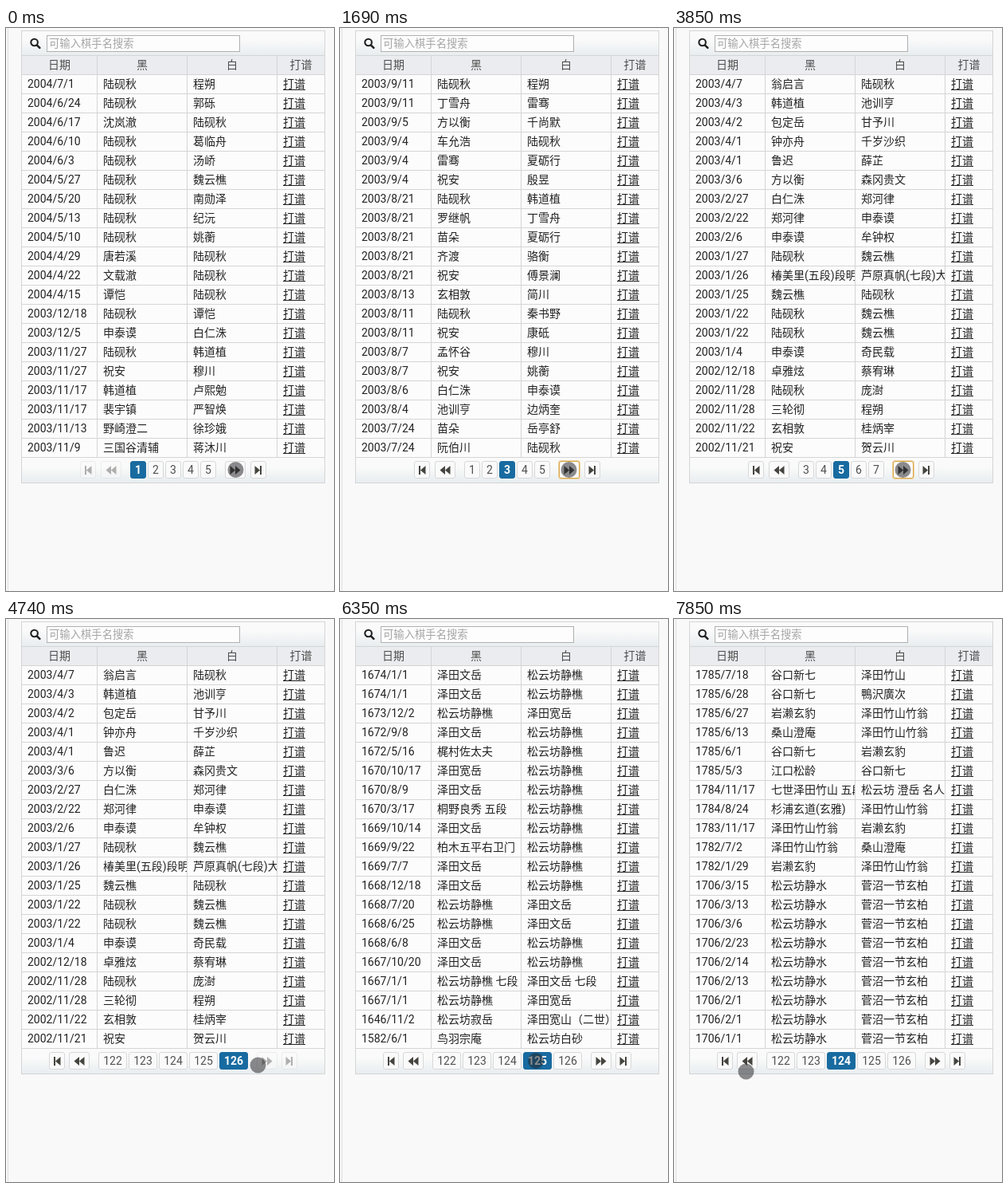
These frames come from a looping animation (412 px wide and 706 px high, 7.99 s). An HTML page:

```html
<!DOCTYPE html>
<html lang="zh-CN">
<head>
<meta charset="utf-8">
<style>
* { box-sizing: border-box; }
html, body { margin: 0; width: 100%; height: 100%; overflow: hidden; }
body { position: relative; background: #f9f9f9; color: #222;
  font: 14px/23px Roboto, "Noto Sans CJK SC", "Noto Sans CJK", sans-serif; }
#edge { position: absolute; left: 2px; top: 0; bottom: 0; width: 1px; background: #dedede; }
#grid { position: absolute; left: 19px; top: 3px; width: 382px; height: 568px;
  border: 1px solid #d5d5d5; background: #fcfcfc; }
.bar { position: relative; height: 30px; background: linear-gradient(#fafafa 35%, #e8edf0); }
.bar svg { position: absolute; left: 10px; top: 8px; }
.field { position: absolute; left: 31px; top: 5px; width: 243px; height: 21px; padding-left: 2px;
  border: 1px solid #b0b0b0; background: #fdfdfd; color: #a5a5a5; font-size: 13.33px; line-height: 19px; }
.row { display: grid; grid-template-columns: 95px 113px 113px 59px; height: 24px; border-top: 1px solid #d5d5d5; }
.row > * { padding-left: 7px; overflow: hidden; white-space: pre; border-right: 1px solid #d5d5d5; }
.row > :last-child { border-right: 0; }
.row u { text-underline-offset: 2px; }
.head { background: #ebecf0; color: #4f4f4f; text-align: center; }
.head > * { padding: 0; }
#pager { display: flex; justify-content: center; height: 32px; padding-top: 4px; border-top: 1px solid #d5d5d5; }
#pager i { flex: none; height: 22px; border: 1px solid #d7d8d9; border-radius: 3px; background: #fafafa;
  color: #4f4f4f; font-style: normal; line-height: 20px; text-align: center; }
#pager .num + .num { margin-left: 2px; }
#pager .on { background: #186ba0; border-color: #186ba0; color: #fff; font-weight: bold; }
#pager .off { opacity: .4; }
#pager .ring { border-color: #dba648; box-shadow: 0 0 0 1px #ecd2a0; }
#pager .flip { transform: scaleX(-1); }
#pager svg { position: static; display: block; margin: -1px; fill: #45443f; }
#pointer { position: absolute; left: -10px; top: -10px; width: 20px; height: 20px; border-radius: 50%; }
</style>
</head>
<body>
<div id="edge"></div>
<div id="grid">
  <div class="bar">
    <svg width="14" height="15" fill="none" stroke="#222"><circle cx="5.6" cy="6" r="4.3" stroke-width="2.1"/><path d="M8.8 9.3L12.3 12.8" stroke-width="2.6" stroke-linecap="round"/></svg>
    <div class="field">可输入棋手名搜索</div>
  </div>
  <div class="row head"><span>日期</span><span>黑</span><span>白</span><span>打谱</span></div>
  <div id="rows"></div>
  <div id="pager" class="bar"></div>
</div>
<div id="pointer"></div>
<script>
// One game per line: date|black|white
const games = {
1: `2004/7/1|陆砚秋|程朔
2004/6/24|陆砚秋|郭砾
2004/6/17|沈岚澈|陆砚秋
2004/6/10|陆砚秋|葛临舟
2004/6/3|陆砚秋|汤峤
2004/5/27|陆砚秋|魏云樵
2004/5/20|陆砚秋|南勋泽
2004/5/13|陆砚秋|纪沅
2004/5/10|陆砚秋|姚蘅
2004/4/29|唐若溪|陆砚秋
2004/4/22|文载澈|陆砚秋
2004/4/15|谭恺|陆砚秋
2003/12/18|陆砚秋|谭恺
2003/12/5|申泰谟|白仁洙
2003/11/27|陆砚秋|韩道植
2003/11/27|祝安|穆川
2003/11/17|韩道植|卢熙勉
2003/11/17|裴宇镇|严智焕
2003/11/13|野崎澄二|徐珍娥
2003/11/9|三国谷清辅|蒋沐川`,
2: `2003/11/6|陆砚秋|姚蘅
2003/11/6|祝安|纪沅
2003/10/30|魏云樵|陆砚秋
2003/10/30|雷骞|汤峤
2003/10/23|陆砚秋|殷昱
2003/10/23|祝安|简川
2003/10/20|申泰谟|严智焕
2003/10/16|陆砚秋|穆川
2003/10/16|苗朵|祝安
2003/10/9|谭恺|陆砚秋
2003/10/9|丁雪舟|骆衡
2003/10/2|白仁洙|裴宇镇
2003/9/25|陆砚秋|康砥
2003/9/25|祝安|孟怀谷
2003/9/22|韩道植|白仁洙
2003/9/18|夏砺行|陆砚秋
2003/9/18|齐渡|雷骞
2003/9/15|卢熙勉|申泰谟
2003/9/13|方以衡|蒋沐川
2003/9/11|祝安|郭砾`,
3: `2003/9/11|陆砚秋|程朔
2003/9/11|丁雪舟|雷骞
2003/9/5|方以衡|千尚默
2003/9/4|车允浩|陆砚秋
2003/9/4|雷骞|夏砺行
2003/9/4|祝安|殷昱
2003/8/21|陆砚秋|韩道植
2003/8/21|罗继帆|丁雪舟
2003/8/21|苗朵|夏砺行
2003/8/21|齐渡|骆衡
2003/8/21|祝安|傅景澜
2003/8/13|玄相敦|简川
2003/8/11|陆砚秋|秦书野
2003/8/11|祝安|康砥
2003/8/7|孟怀谷|穆川
2003/8/7|祝安|姚蘅
2003/8/6|白仁洙|申泰谟
2003/8/4|池训亨|边炳奎
2003/7/24|苗朵|岳亭舒
2003/7/24|阮伯川|陆砚秋`,
4: `2003/7/24|柯雨岑|尤思齐
2003/7/19|白仁洙|申泰谟
2003/7/17|陆砚秋|褚宁
2003/7/11|申泰谟|白仁洙
2003/7/10|明淑雅|具东锡
2003/7/10|邵同|陆砚秋
2003/6/30|申泰谟|郑河律
2003/6/27|石万基|丘贤彬
2003/6/24|都俊熙|奉志勋
2003/6/22|水濑由香江|上久我原直人
2003/6/19|潘成浩|魏云樵
2003/5/30|郑河律|丘贤彬
2003/5/28|琴宗焕|丘贤彬
2003/5/9|潘成浩|吕昌模
2003/5/8|方以衡|浅沼良辅
2003/4/29|汪柘|白仁洙
2003/4/27|雷骞|玄相敦
2003/4/23|申泰谟|白仁洙
2003/4/23|齐渡|穆川
2003/4/9|郑河律|白仁洙`,
5: `2003/4/7|翁启言|陆砚秋
2003/4/3|韩道植|池训亨
2003/4/2|包定岳|甘予川
2003/4/1|钟亦舟|千岁沙织
2003/4/1|鲁迟|薛芷
2003/3/6|方以衡|森冈贵文
2003/2/27|白仁洙|郑河律
2003/2/22|郑河律|申泰谟
2003/2/6|申泰谟|牟钟权
2003/1/27|陆砚秋|魏云樵
2003/1/26|椿美里(五段)段明|芦原真帆(七段)大
2003/1/25|魏云樵|陆砚秋
2003/1/22|陆砚秋|魏云樵
2003/1/22|陆砚秋|魏云樵
2003/1/4|申泰谟|奇民载
2002/12/18|卓雅炫|蔡宥琳
2002/11/28|陆砚秋|庞澍
2002/11/28|三轮彻|程朔
2002/11/22|玄相敦|桂炳宰
2002/11/21|祝安|贺云川`,
124: `1785/7/18|谷口新七|泽田竹山
1785/6/28|谷口新七|鴨沢廣次
1785/6/27|岩濑玄豹|泽田竹山竹翁
1785/6/13|桑山澄庵|泽田竹山竹翁
1785/6/1|谷口新七|岩濑玄豹
1785/5/3|江口松龄|谷口新七
1784/11/17|七世泽田竹山 五段|松云坊 澄岳 名人
1784/8/24|杉浦玄道(玄雅)|泽田竹山竹翁
1783/11/17|泽田竹山竹翁|岩濑玄豹
1782/7/2|泽田竹山竹翁|桑山澄庵
1782/1/29|岩濑玄豹|泽田竹山竹翁
` + ["3/15", "3/13", "3/6", "2/23", "2/14", "2/13", "2/1", "2/1", "1/1"]
  .map(day => `1706/${day}|松云坊静水|菅沼一节玄柏`).join("\n"),
125: `1706/1/1|松云坊静水|菅沼一节玄柏
1697/8/12|堀江元柏 七段|松云坊静樵
1697/6/26|堀江元柏|松云坊静樵
1697/6/10|片桐一喜|松云坊静樵
1697/6/6|片桐一喜|松云坊静樵
1696/11/29|泽田竹翁|松云坊静樵
1683/11/19|泽田夏山|松云坊静樵
1683/1/28|菅沼一砂玄柏|松云坊静樵
1683/1/18|菅沼一砂玄柏|松云坊静樵
1682/12/1|平冈静真|松云坊静樵
1682/12/1|平冈静真|松云坊静樵
1682/4/17|里之子仲间原 (南|松云坊 静樵 名人
1682/4/17|里之子仲间原|松云坊静樵
1681/9/30|松云坊静川|松云坊静樵
1678/10/14|菅沼一砂玄柏|松云坊静樵
1676/1/1|泽田文岳|松云坊静樵
1675/10/20|泽田宽岳|松云坊静樵
1675/8/6|泽田夏山|松云坊静樵
1674/11/24|泽田宽岳|松云坊静樵
1674/1/1|泽田文岳|松云坊静樵`,
126: `1674/1/1|泽田文岳|松云坊静樵
1674/1/1|泽田文岳|松云坊静樵
1673/12/2|松云坊静樵|泽田宽岳
1672/9/8|泽田文岳|松云坊静樵
1672/5/16|梶村佐太夫|松云坊静樵
1670/10/17|泽田宽岳|松云坊静樵
1670/8/9|泽田文岳|松云坊静樵
1670/3/17|桐野良秀 五段|松云坊静樵
1669/10/14|泽田文岳|松云坊静樵
1669/9/22|柏木五平右卫门|松云坊静樵
1669/7/7|泽田文岳|松云坊静樵
1668/12/18|泽田文岳|松云坊静樵
1668/7/20|松云坊静樵|泽田文岳
1668/6/25|松云坊静樵|泽田文岳
1668/6/8|泽田文岳|松云坊静樵
1667/10/20|泽田文岳|松云坊静樵
1667/1/1|松云坊静樵 七段|泽田文岳 七段
1667/1/1|松云坊静樵|泽田宽岳
1646/11/2|松云坊寂岳|泽田宽山（二世）
1582/6/1|鸟羽宗庵|松云坊白砂`
};

// Each step changes part of the state; "page" is the pager, "data" the loaded rows.
const duration = 7990, lastPage = 126;
const steps = [
  [0, { page: 1, data: 1, x: 288.5, y: 554, press: 0, ring: 0 }],
  [150, { press: 1 }],
  [310, { page: 2, ring: 1 }],
  [580, { data: 2, press: 0 }],
  [1450, { press: 1 }],
  [1570, { page: 3 }],
  [1690, { data: 3, press: 0, x: 287.5 }],
  [2250, { page: 4, press: 1, ring: 0 }],
  [2410, { press: 0, ring: 1 }],
  [2720, { data: 4 }],
  [3460, { page: 5, press: 1, ring: 0 }],
  [3580, { press: 0, ring: 1 }],
  [3850, { data: 5 }],
  [4010, { x: 292, y: 553, ring: 0 }],
  [4160, { x: 328, y: 545 }],
  [4440, { x: 317, y: 558 }],
  [4740, { page: 126, x: 316.5, y: 559.5 }],
  [5020, { data: 126 }],
  [5420, { x: 290, y: 568 }],
  [5540, { x: 262, y: 567 }],
  [5690, { x: 247.5, y: 564.5 }],
  [5810, { x: 245, y: 560 }],
  [5930, { x: 245, y: 557 }],
  [6080, { x: 246, y: 554, press: 1 }],
  [6230, { page: 125 }],
  [6350, { press: 0 }],
  [6500, { data: 125, x: 223, y: 557 }],
  [6770, { x: 219, y: 557 }],
  [6890, { x: 217, y: 557 }],
  [7040, { x: 215.5, y: 560, press: 1 }],
  [7170, { page: 124, press: 0 }],
  [7320, { data: 124, x: 213, y: 569 }],
  [7570, { x: 180, y: 571 }],
  [7690, { x: 130, y: 571 }],
  [7850, { x: 90.5, y: 567.5 }]
];

const $ = id => document.getElementById(id);
const icons = {
  20: "M6 6h2v11h-2zM8 11.5L14.5 6v11z",
  26: "M6.5 11.5L13 6v11zM13 11.5L19.5 6v11z"
};

function arrow(width, margin, classes) {
  return `<i class="${classes}" style="width:${width}px;margin:${margin}"><svg width="${width}" height="22"><path d="${icons[width]}"/></svg></i>`;
}

function pagerHtml({ page, ring }) {
  const first = Math.max(1, Math.min(page - 2, lastPage - 4));
  const wide = first > 99, gap = wide ? 5 : 6;
  const back = page === 1 ? "off" : "";
  const forward = "flip" + (page === lastPage ? " off" : "");
  const numbers = Array.from({ length: 5 }, (_, k) => first + k).map(n =>
    `<i class="num${n === page ? " on" : ""}" style="width:${wide ? 36 : 20}px">${n}</i>`);
  return arrow(20, `0 ${gap}px 0 0`, back) + arrow(26, "0 11px 0 0", back) + numbers.join("") +
    arrow(26, "0 0 0 11px", forward + (ring ? " ring" : "")) + arrow(20, `0 0 0 ${gap}px`, forward);
}

function rowHtml(line) {
  const cells = line.split("|").map(text => `<span>${text}</span>`).join("");
  return `<div class="row">${cells}<span><u>打谱</u></span></div>`;
}

let shown = {};
function draw() {
  const time = performance.now() % duration;
  const state = Object.assign({}, ...steps.filter(([at]) => at <= time).map(step => step[1]));
  if (state.data !== shown.data) $("rows").innerHTML = games[state.data].split("\n").map(rowHtml).join("");
  if (state.page !== shown.page || state.ring !== shown.ring) $("pager").innerHTML = pagerHtml(state);
  $("pointer").style.transform = `translate(${state.x}px, ${state.y}px)`;
  $("pointer").style.background = `rgba(35, 35, 38, ${state.press ? 0.62 : 0.52})`;
  shown = state;
  requestAnimationFrame(draw);
}
draw();
</script>
</body>
</html>
```
